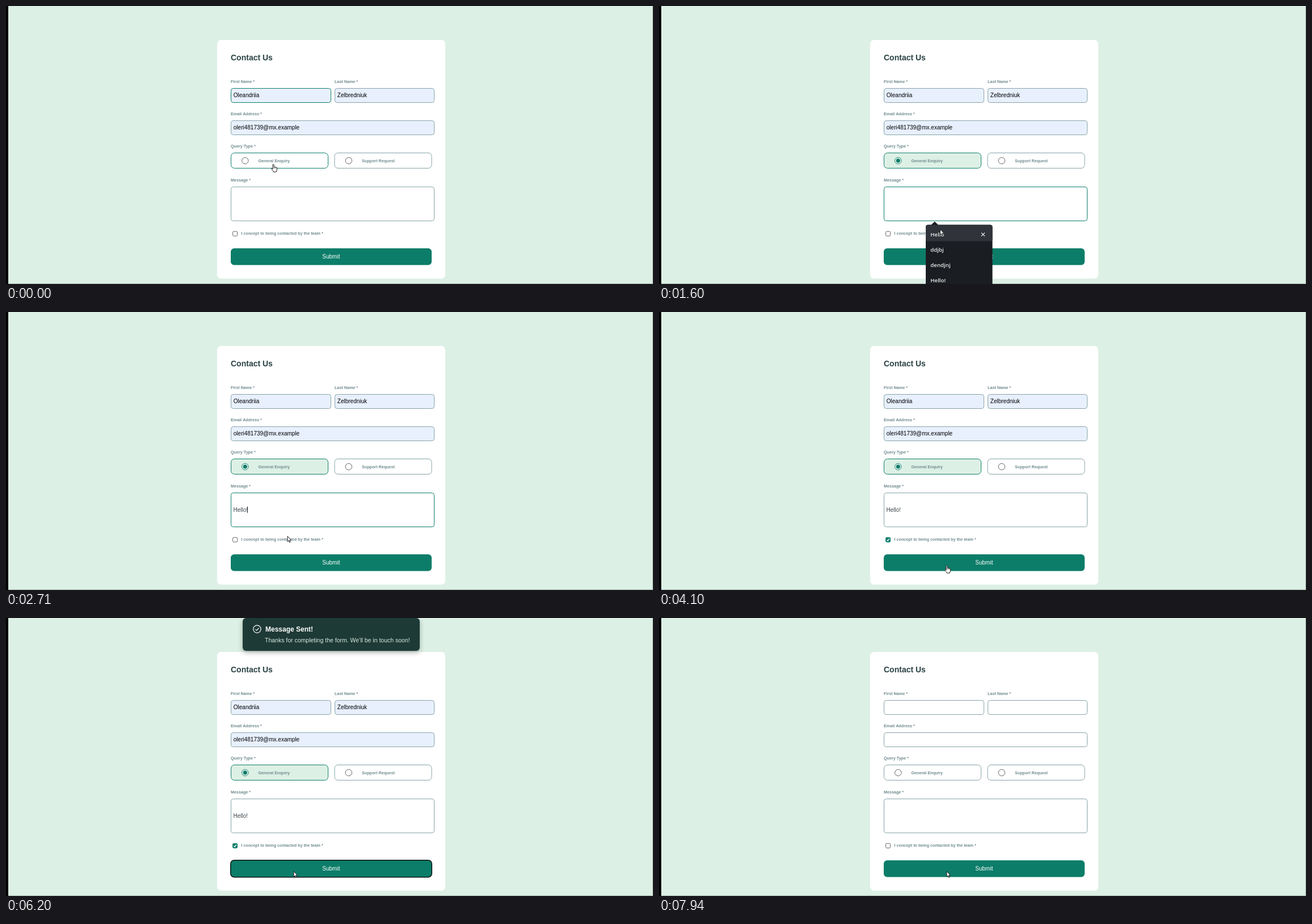
Animation of 1140 by 491 pixels, one loop 8 s. Source, as an HTML page with a canvas:

```html
<!DOCTYPE html>
<html lang="en">
<head>
<meta charset="utf-8">
<title>Contact form</title>
<style>
  html, body { margin: 0; width: 100%; height: 100%; overflow: hidden; background: #ddf0e5; }
  canvas { display: block; }
</style>
</head>
<body>
<canvas id="stage" width="1140" height="491"></canvas>
<script>
const ctx = document.getElementById('stage').getContext('2d');
const LOOP = 8000;
const SANS = '"Liberation Sans", Arial, sans-serif';
const MENU = '"Open Sans", "Noto Sans", sans-serif';
const GREEN = '#0c7d69', MINT = '#ddf0e5', GREY = '#87a3a7', LABEL = '#708b8f', AUTOFILL = '#e8f0fe';

const HAND = new Path2D('M3 9V1.8a1.1 1.1 0 0 1 2.2 0V5.6c.3-.8 1.7-.7 1.9.2.4-.6 1.6-.4 1.7.4.5-.4 1.6-.2 1.6.8V10c0 1.6-1 2.2-1.1 4H4.2C4 12.4 1.6 10.4.8 8.6.4 7.6 1.6 7 2.2 7.8Z');
const ARROW = new Path2D('M0 0V9.6L2.2 7.6 3.6 10.8 5 10.2 3.7 7.1H6.6Z');
const BEAM = new Path2D('M-2.5 .5H-1Q0 .5 0 1.5V14.5Q0 15.5 -1 15.5H-2.5M2.5 .5H1Q0 .5 0 1.5M0 14.5Q0 15.5 1 15.5H2.5');

// time, shape, x, y
const POINTER = [
  [0, HAND, 467, 279], [400, BEAM, 463, 364], [670, HAND, 457, 363],
  [1360, HAND, 475, 378], [1480, ARROW, 495.5, 394.5], [1880, ARROW, 496, 396],
  [3250, ARROW, 445, 400], [3400, HAND, 399, 398], [3830, ARROW, 500, 429],
  [3980, ARROW, 507, 448], [4100, HAND, 503, 447], [6200, ARROW, 507, 447.5],
  [6450, HAND, 503, 447], [7940, ARROW, 507, 447.5]
];

const within = (t, a, b) => t >= a && t < b;

function text(str, x, y, size, color, weight = 400, family = SANS) {
  ctx.font = `${weight} ${size}px ${family}`;
  ctx.fillStyle = color;
  ctx.fillText(str, x, y);
}

const label = (str, x, y) => text(str, x, y, 7.2, LABEL, 700);

function box(x, y, w, h, r, fill, stroke, line = 1) {
  ctx.beginPath();
  ctx.roundRect(x, y, w, h, r);
  if (fill) { ctx.fillStyle = fill; ctx.fill(); }
  if (stroke) { ctx.strokeStyle = stroke; ctx.lineWidth = line; ctx.stroke(); }
}

function circle(x, y, r, fill, stroke, line = 1) {
  ctx.beginPath();
  ctx.arc(x, y, r, 0, Math.PI * 2);
  if (fill) { ctx.fillStyle = fill; ctx.fill(); }
  if (stroke) { ctx.strokeStyle = stroke; ctx.lineWidth = line; ctx.stroke(); }
}

function polyline(points, color, line) {
  ctx.beginPath();
  points.forEach(([x, y]) => ctx.lineTo(x, y));
  ctx.strokeStyle = color;
  ctx.lineWidth = line;
  ctx.stroke();
}

function page() {
  ctx.fillStyle = MINT;
  ctx.fillRect(0, 0, 1140, 491);
  ctx.fillStyle = '#a3b3ab';
  ctx.fillRect(0, 490, 1140, 1);
  ctx.fillRect(1139, 0, 1, 491);
  ctx.fillStyle = '#000';
  ctx.fillRect(0, 0, 4, 491);
  box(372, 60, 402, 421.5, 7, '#fff');
  text('Contact Us', 396, 96, 14, '#2a4144', 700);
}

function field(name, value, x, y, w, filled, focus) {
  label(name, x - .5, y - 9.5);
  box(x, y, w, 25, 4, filled ? AUTOFILL : '#fff', focus ? GREEN : GREY);
  if (filled) text(value, x + 4.3, y + 15.5, 10, '#000');
}

function radio(name, x, on, hover) {
  box(x, 259.5, 171, 27, 6, on ? MINT : '#fff', on || hover ? GREEN : GREY);
  circle(x + 24.8, 273.2, 5.7, '#fff', on ? GREEN : '#666');
  if (on) circle(x + 24.8, 273.2, 3.6, GREEN);
  label(name, x + 48, 275.7);
}

function message(t) {
  const preview = within(t, 1610, 2710);
  const typed = within(t, 2710, 6330);
  label('Message *', 396, 310);
  box(396.5, 319.5, 358, 60, 4, preview ? AUTOFILL : '#fff', within(t, 400, 3400) ? GREEN : GREY);
  if (preview) text('Hello', 400.5, 352.5, 10, '#111');
  if (typed) text('Hello!', 400.5, 352.5, 10, '#40484d');
  ctx.fillStyle = '#333';
  if (within(t, 820, 1360)) ctx.fillRect(400, 344, 1, 11);
  if (within(t, 2030, 2430)) ctx.fillRect(422, 343.5, 1, 11.5);
  if (within(t, 2710, 3120)) ctx.fillRect(425, 343.5, 1, 11.5);
}

function consent(on) {
  box(399.6, 398.2, 8, 8, 1.6, on ? GREEN : '#fff', on ? GREEN : '#666');
  if (on) polyline([[401.3, 402.4], [403, 404.2], [406.1, 400.2]], '#fff', 1.3);
  label('I concept to being contacted by the team *', 414.6, 404.4);
}

function submit(focus) {
  box(396, 428, 354, 29.5, 6, GREEN);
  if (focus) box(395.7, 427.7, 354.6, 30.1, 6.5, null, '#0b1513', 1.5);
  text('Submit', 557.3, 445.6, 10, '#fff');
}

function menu(t) {
  if (!within(t, 820, 2180)) return;
  const fading = t < 940 || t >= 2030;
  ctx.save();
  if (fading) {
    ctx.globalAlpha = t < 940 ? .5 : .33;
    ctx.translate(528.7, 436);
    ctx.scale(.965, .965);
    ctx.translate(-528.7, -436);
  }
  ctx.beginPath();
  ctx.roundRect(470, 386.5, 117.5, 130, 4);
  ctx.moveTo(479.5, 386.5);
  ctx.lineTo(485.8, 380.8);
  ctx.lineTo(492, 386.5);
  ctx.fillStyle = '#1a1d21';
  ctx.fill();
  if (t >= 1480) {
    box(470, 386.5, 117.5, 29, 4, '#30343a');
    polyline([[568, 400.5], [574, 406.5]], '#e4e6e8', 1.1);
    polyline([[574, 400.5], [568, 406.5]], '#e4e6e8', 1.1);
  }
  if (fading) ctx.globalAlpha = .6;
  ['Hello', 'ddjbj', 'dendjnj', 'Hello!'].forEach((word, i) =>
    text(word, 478.3, 407 + i * 27, 9.7, '#eceeee', 600, MENU));
  ctx.restore();
}

function toast() {
  ctx.save();
  ctx.shadowColor = 'rgba(0,0,0,.3)';
  ctx.shadowBlur = 8;
  ctx.shadowOffsetY = 3;
  box(417, 0, 312, 58, 6, '#1e3a36');
  ctx.restore();
  circle(442.4, 19.6, 6.7, null, '#fff', 1.2);
  polyline([[439.4, 19.9], [441.6, 22], [445.6, 17.6]], '#fff', 1.2);
  text('Message Sent!', 457, 24, 12, '#fff', 700);
  text("Thanks for completing the form. We'll be in touch soon!", 456, 43.2, 10.5, '#d6eae0');
}

function pointer(t) {
  const [, shape, x, y] = POINTER.filter(p => p[0] <= t).pop();
  ctx.save();
  ctx.translate(x, y);
  ctx.lineJoin = 'round';
  ctx.lineWidth = 1;
  ctx.strokeStyle = '#1c1c1c';
  if (shape !== BEAM) { ctx.fillStyle = '#fff'; ctx.fill(shape); }
  ctx.stroke(shape);
  if (shape === HAND) {
    ctx.lineWidth = .6;
    ctx.stroke(new Path2D('M5.2 5.6V8M7.1 5.8V8M8.8 6.2V8'));
  }
  ctx.restore();
}

function draw(t) {
  const filled = t < 6330;
  page();
  field('First Name *', 'Oleandriia', 396.5, 145.5, 176, filled, t < 120);
  field('Last Name *', 'Zelbredniuk', 579.5, 145.5, 175, filled);
  field('Email Address *', 'oleri481739@mx.example', 396.5, 202.5, 358, filled);
  label('Query Type *', 396, 249.7);
  radio('General Enquiry', 396.5, within(t, 120, 6330), t < 120);
  radio('Support Request', 579, false);
  message(t);
  consent(within(t, 3550, 6330));
  submit(within(t, 6200, 6330));
  menu(t);
  if (within(t, 4650, 6330)) toast();
  pointer(t);
}

const start = performance.now();
function tick() {
  draw((performance.now() - start) % LOOP);
  requestAnimationFrame(tick);
}
tick();
</script>
</body>
</html>
```
